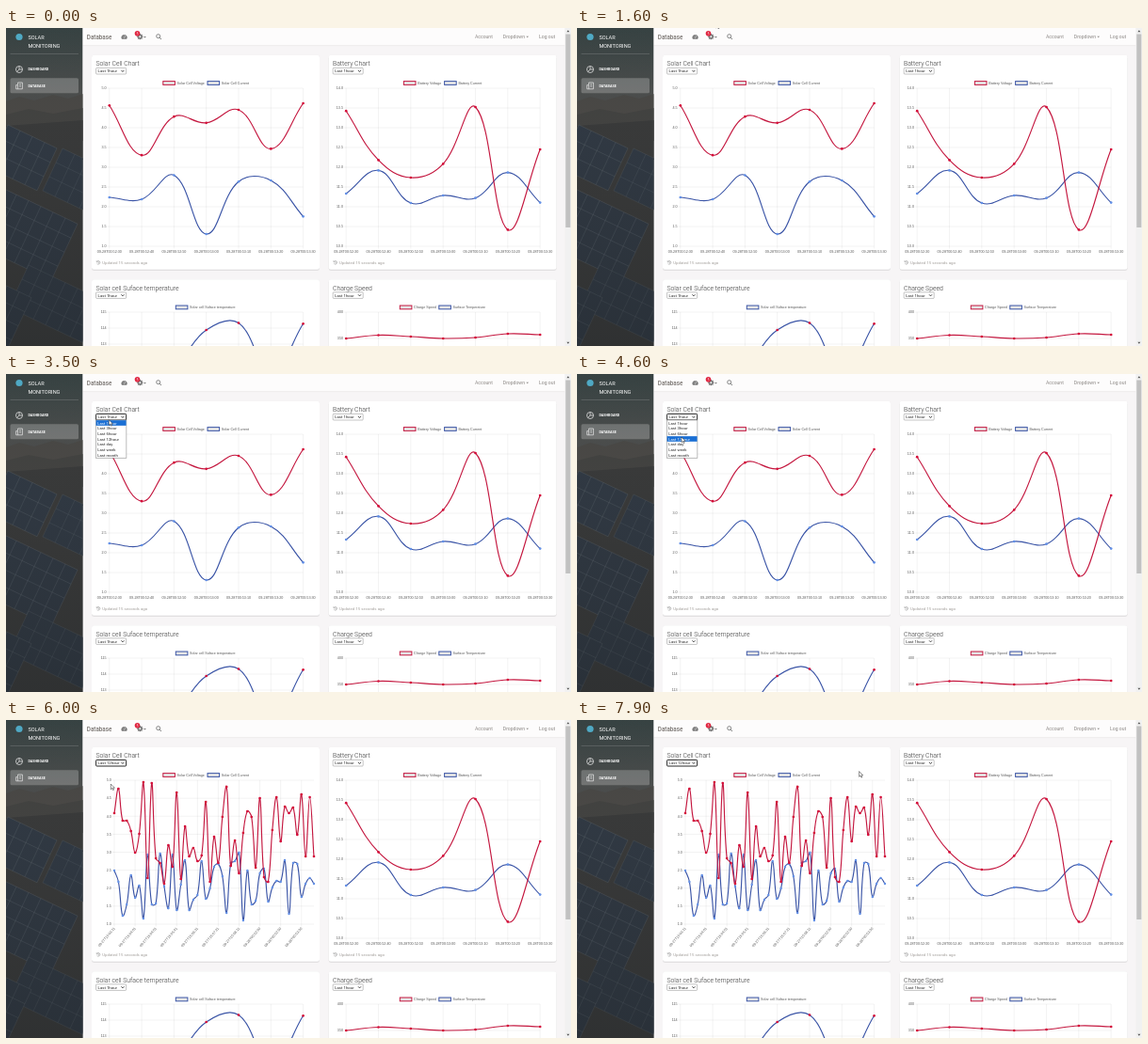
An HTML page for the animation above (8 s loop, 600 by 338 pixels).

```html
<!DOCTYPE html>
<html lang="en">
<head>
<meta charset="utf-8">
<title>Solar monitoring</title>
<style>
  html, body { margin: 0; width: 100%; height: 100%; overflow: hidden; background: #f7f5f6; }
  svg { display: block; width: 100vw; height: 100vh; }
  text { font-family: Roboto, sans-serif; white-space: pre; }
  .tick { font: 3.7px "Liberation Sans", Arial, sans-serif; fill: #555; }
  .grid { stroke: #000; stroke-opacity: .1; stroke-width: .5; fill: none; }
  .line { fill: none; stroke-width: 1.15; }
</style>
</head>
<body>
<svg id="stage" viewBox="0 0 600 338"></svg>
<script>
const LOOP = 8000, OPEN = 3000, PICK = 4950, UPDATE = 5085, EASE_MS = 1000;
const RED = { line: '#c4173f', dot: '#d50f3a' };
const BLUE = { line: '#3a54a6', dot: '#6390e6' };
const OPTIONS = ['1hour', '3hour', '6hour', '12hour', 'day', 'week', 'month'];
const ROW = 5.65, MENU_TOP = 49.2;

const text = (x, y, size, fill, str, extra = '') =>
  `<text x="${x}" y="${y}" font-size="${size}" fill="${fill}" ${extra}>${str}</text>`;
const tick = (x, y, str, anchor = 'start', extra = '') =>
  `<text class="tick" x="${x}" y="${y}" text-anchor="${anchor}" ${extra}>${str}</text>`;
const rect = (x, y, w, h, fill, extra = '') =>
  `<rect x="${x}" y="${y}" width="${w}" height="${h}" fill="${fill}" ${extra}/>`;
const path = (d, extra) => `<path d="${d}" ${extra}/>`;
const circle = (x, y, r, extra) => `<circle cx="${x}" cy="${y}" r="${r}" ${extra}/>`;
const range = (n, f) => Array.from({ length: n }, (_, i) => f(i));
const mix = (a, b, k) => a + (b - a) * k;

// Spline knots as [x, y, inX, inY, outX, outY], handles kept inside the plot
function knots(pts, box, tension = .4) {
  const cx = v => Math.min(box.r, Math.max(box.l, v));
  const cy = v => Math.min(box.b, Math.max(box.t, v));
  return pts.map(([x, y], i) => {
    const a = pts[i - 1] || [x, y], c = pts[i + 1] || [x, y];
    const d0 = Math.hypot(x - a[0], y - a[1]), d1 = Math.hypot(c[0] - x, c[1] - y);
    const ka = tension * d0 / (d0 + d1), kb = tension * d1 / (d0 + d1);
    const dx = c[0] - a[0], dy = c[1] - a[1];
    return [x, y, cx(x - ka * dx), cy(y - ka * dy), cx(x + kb * dx), cy(y + kb * dy)];
  });
}
function curve(ks) {
  return ks.map((k, i) => {
    const p = ks[i - 1];
    return i ? `C${p[4]} ${p[5]} ${k[2]} ${k[3]} ${k[0]} ${k[1]}` : `M${k[0]} ${k[1]}`;
  }).join('');
}
const series = (ks, color, dot = color.dot, r = 1.35) =>
  path(curve(ks), `class="line" stroke="${color.line}"`) +
  ks.map(k => circle(k[0], k[1], r, `fill="${dot}"`)).join('');
const spread = (ys, box) =>
  knots(ys.map((y, i) => [mix(box.l, box.r, i / (ys.length - 1)), y]), box);

function axes(box, top, step, count, rowH, cols, colW, digits) {
  let d = '', out = '';
  for (let i = 0; i < count; i++) {
    const y = box.t + i * rowH;
    d += `M${box.l - 2.5} ${y}H${box.r}`;
    out += tick(box.l - 3.2, y + 1.3, (top - i * step).toFixed(digits), 'end');
  }
  for (let i = 0; i < cols; i++) d += `M${box.l + i * colW} ${box.t}V${box.b + 2.5}`;
  return path(d, 'class="grid"') + out;
}
const TIMES = ['52:30', '52:40', '52:50', '53:00', '53:10', '53:20', '53:30'];
const hourLabels = box => TIMES.map((s, i) =>
  tick(mix(box.l, box.r, i / 6), 238.6, '09-28T00:' + s, 'middle')).join('');

const legend = (x, y, color, label) =>
  rect(x, y, 12.6, 3.8, 'rgba(0,0,0,.1)', `stroke="${color.line}" stroke-width="1"`) +
  tick(x + 14.8, y + 3.2, label);

function select(x, y, label, id = '') {
  return rect(x, y, 32, 6.6, '#fff', `rx=".8" stroke="#888" stroke-width=".5" ${id && `id="${id}"`}`) +
    text(x + 2, y + 4.9, 4.3, '#222', label, id && `id="${id}Text"`) +
    path(`M${x + 26.8} ${y + 2.5}l1.5 1.6 1.5 -1.6`, 'fill="none" stroke="#222" stroke-width=".8"');
}
function card(x, y, title, id) {
  return rect(x, y, 242, 228, '#fff', 'rx="2.4" filter="url(#shadow)"') +
    text(x + 4.4, y + 11.3, 6.85, '#333', title, 'font-weight="300"') +
    select(x + 4.6, y + 13.6, 'Last 1hour', id);
}
const updated = x =>
  path(`M${x} 248.2a1.8 1.8 0 1 1 -.1 2M${x - .4} 247.2v1.5h1.5M${x + 1.7} 248.3v1.3l.9 .5`,
    'fill="none" stroke="#999" stroke-width=".6"') +
  text(x + 5.6, 251.2, 4.35, '#a09c98', 'Updated 15 seconds ago');

function panelField(ox, oy, cols, rows, opacity) {
  const u = [13, 6.2], v = [-7, 15];
  const at = (i, j) => `${ox + i * u[0] + j * v[0]} ${oy + i * u[1] + j * v[1]}`;
  let d = '';
  for (let i = 0; i <= cols; i++) d += `M${at(i, 0)}L${at(i, rows)}`;
  for (let j = 0; j <= rows; j++) d += `M${at(0, j)}L${at(cols, j)}`;
  return path(`M${at(0, 0)}L${at(cols, 0)}L${at(cols, rows)}L${at(0, rows)}Z`, 'fill="#333d49"') +
    path(d, `stroke="#8c969e" stroke-opacity="${opacity}" stroke-width=".7" fill="none"`);
}
function sidebar() {
  return `<g clip-path="url(#side)">` + rect(0, 0, 81.5, 338, 'url(#sky)') +
    path('M0 78L14 73 30 77 50 71 66 75 82 70V120H0Z', 'fill="#514f4c"') +
    path('M0 92L24 86 50 91 82 85V140H0Z', 'fill="#484846"') +
    path('M0 104L82 98V338H0Z', 'fill="#3d3e3e"') +
    panelField(2, 103, 4, 3, .28) + panelField(60, 128, 4, 3, .22) +
    panelField(-2, 171, 6, 4, .3) + panelField(24, 252, 6, 3, .24) + panelField(-12, 268, 3, 5, .28) +
    rect(0, 0, 81.5, 338, 'url(#shade)') + '</g>' +
    circle(14, 9.5, 3.6, 'fill="#4fa9c4"') +
    text(23.4, 11.6, 5.6, '#fff', 'SOLAR') + text(23.4, 20.8, 5.6, '#fff', 'MONITORING') +
    rect(4.5, 27.3, 72.5, .4, '#fff', 'opacity=".35"') +
    rect(4.5, 53.3, 72.5, 16, '#fff', 'rx="1.6" opacity=".22"') +
    text(23.4, 45.4, 3.7, '#fff', 'DASHBOARD', 'font-weight="700"') +
    text(23.4, 62.7, 3.7, '#fff', 'DATABASE', 'font-weight="700"') +
    circle(14, 44, 3.5, 'fill="none" stroke="#ddd" stroke-width=".8"') +
    path('M14 40.5V44H17.5M14 44l-2.3 2.5M12.6 58h4.8v6.8h-6.7v-4.2h1.9zM12.6 60.6v4.2M14 60h2M14 62h2',
      'fill="none" stroke="#ddd" stroke-width=".8"');
}
function header() {
  const teeth = range(8, i => `M142.3 9.2l${3.1 * Math.cos(i * Math.PI / 4)} ${3.1 * Math.sin(i * Math.PI / 4)}`).join('');
  return rect(81.5, 0, 512, 18.8, '#fdfcfc') + rect(81.5, 18.6, 512, .5, '#dedcdc') +
    text(85.8, 11.8, 6.3, '#77726e', 'Database', 'font-weight="500"') +
    path('M123 11.8a3.1 3.1 0 1 1 5.2 0z', 'fill="#777"') +
    path('M125.6 10.8l1.1 -2.6M123.9 9.4h.6M125.6 7.2v.5', 'stroke="#fff" stroke-width=".6"') +
    path(teeth, 'stroke="#777" stroke-width="1.4"') +
    circle(142.3, 9.2, 1.6, 'fill="#fdfcfc" stroke="#777" stroke-width="1.3"') +
    path('M146.2 8.9h2.6l-1.3 1.5z', 'fill="#777"') +
    circle(139.5, 5.8, 2.8, 'fill="#e0243f"') + text(139.5, 7.1, 3.6, '#fff', '5', 'text-anchor="middle"') +
    circle(161.7, 8.7, 2, 'fill="none" stroke="#777" stroke-width=".9"') +
    path('M163.2 10.3l1.8 1.8', 'stroke="#777" stroke-width="1"') +
    text(498, 11, 5.1, '#8a8683', 'Account') + text(527.8, 11, 5.1, '#8a8683', 'Dropdown') +
    path('M552.4 8.7h2.6l-1.3 1.5z', 'fill="#8a8683"') + text(566, 11, 5.1, '#8a8683', 'Log out');
}
const scrollbar = () =>
  rect(593.6, 0, 6.4, 338, '#f1f1f1') + rect(594.3, 6.5, 5, 205.5, '#c1c1c1') +
  path('M595.4 4.2l1.5 -1.9 1.5 1.9zM595.4 333.8l1.5 1.9 1.5 -1.9z', 'fill="#555"');

const solar = { l: 109.8, r: 315.6, t: 64, b: 232 };
const dense = { l: 115, r: 327, t: 64, b: 217 };
const battery = { l: 361.2, r: 567.2, t: 64, b: 232 };
const heat = { l: 109.8, r: 315.6, t: 302, b: 470 };
const speed = { l: 361.2, r: 567.2, t: 302, b: 470 };

const hourRed = spread([82.3, 135.2, 94.2, 100.8, 87, 128.4, 80], solar);
const hourBlue = spread([180, 182, 156.5, 219, 163.3, 162, 200.3], solar);
const dayRed = spread([99, 73, 107, 107, 118, 141, 121, 66, 168, 67, 147, 152, 174, 133, 156, 77, 169,
  113, 145, 136, 150, 144, 87, 172, 124, 152, 103, 71, 155, 128, 163, 120, 97, 103, 157, 83, 167, 172,
  117, 82, 129, 92, 99, 93, 122, 79, 145, 82, 145], dense);
const dayBlue = spread([160, 172, 208, 196, 165, 189, 176, 211, 143, 196, 195, 142, 177, 200, 143, 202,
  175, 149, 202, 191, 186, 150, 190, 179, 156, 153, 166, 205, 152, 150, 141, 213, 160, 196, 192, 163,
  158, 193, 178, 171, 172, 149, 206, 152, 153, 188, 174, 168, 174], dense);

const HALF_DAY = ['27T15:03:11', '27T15:04:01', '27T15:04:51', '27T15:05:41', '27T15:06:31',
  '27T15:07:21', '27T15:08:11', '28T00:52:00', '28T00:52:50', '28T00:53:30'];
const STEP = 212 / 48 * 5;
const denseLabels = HALF_DAY.map((s, i) => {
  const x = dense.l + i * STEP + 1;
  return tick(x, 221.6, '09-' + s, 'end', `transform="rotate(-50 ${x} 221.6)"`);
}).join('');

const menu = `<g id="menu">` + rect(95.3, MENU_TOP - .2, 32.6, 40.2, '#fff', 'stroke="#777" stroke-width=".5"') +
  rect(95.6, MENU_TOP, 32, ROW, '#1a6fd4', 'id="mark"') +
  OPTIONS.map((o, i) => text(97.2, MENU_TOP + 4.4 + i * ROW, 4.3, '#222', 'Last ' + o, 'class="option"')).join('') + '</g>';

const $ = id => document.getElementById(id);
$('stage').innerHTML = `<defs>
  <clipPath id="side"><rect width="81.5" height="338"/></clipPath>
  <linearGradient id="sky" x2="0" y2="1"><stop stop-color="#3c4848"/><stop offset=".2" stop-color="#545655"/><stop offset="1" stop-color="#3c3e40"/></linearGradient>
  <linearGradient id="shade" x2="0" y2="1"><stop stop-color="#2a3434" stop-opacity=".3"/><stop offset=".3" stop-color="#222" stop-opacity=".15"/><stop offset="1" stop-color="#1b1e20" stop-opacity=".4"/></linearGradient>
  <filter id="shadow" x="-5%" y="-5%" width="110%" height="110%"><feDropShadow dx="0" dy=".5" stdDeviation=".7" flood-color="#777" flood-opacity=".45"/></filter>
</defs>` + rect(0, 0, 600, 338, '#f7f5f6') + header() + sidebar() +
  card(91, 28.8, 'Solar Cell Chart', 'pick') + card(342.6, 28.8, 'Battery Chart') +
  card(91, 267.2, 'Solar cell Suface temperature') + card(342.6, 267.2, 'Charge Speed') +
  legend(166.8, 56.6, RED, 'Solar Cell Voltage') + legend(214, 56.6, BLUE, 'Solar Cell Current') +
  legend(422.4, 56.6, RED, 'Battery Voltage') + legend(465.6, 56.6, BLUE, 'Battery Current') +
  legend(180.3, 295, BLUE, 'Solar cell Suface temperature') +
  legend(418.3, 295, RED, 'Charge Speed') + legend(459.8, 295, BLUE, 'Surface Temperature') +
  `<g id="hourAxes">${axes(solar, 5, .5, 9, 21, 7, 34.3, 1)}${hourLabels(solar)}</g>` +
  `<g id="denseAxes">${axes(dense, 5, .5, 9, 153 / 8, 10, STEP, 1)}${denseLabels}</g>` +
  `<g id="plot"></g>` +
  axes(battery, 14, .5, 9, 21, 7, 206 / 6, 1) + hourLabels(battery) +
  series(spread([176, 151.4, 186, 178, 180.7, 153.6, 185.6], battery), BLUE) +
  series(spread([88.2, 140.4, 159, 144.4, 84, 214.4, 129], battery), RED) +
  updated(96.6) + updated(348.3) +
  axes(heat, 115, 1, 3, 17, 7, 34.3, 0) +
  series(spread([365, 372, 360, 321, 313.5, 368, 314.3], heat), BLUE, RED.dot) +
  axes(speed, 400, 50, 2, 28, 7, 206 / 6, 0) +
  series(spread([330, 326.5, 328, 330, 329, 325, 326], speed), RED) +
  scrollbar() + menu +
  `<g id="cursor">${path('M0 0V5.7L1.4 4.5 2.3 6.6 3.2 6.2 2.3 4.2H4.1Z', 'fill="#fff" stroke="#222" stroke-width=".5"')}</g>`;

const options = [...document.querySelectorAll('.option')];
const TRACK = [[1500, 150, -9], [2200, 109, 46], [3300, 109, 46], [4200, 111, 67], [4600, 111, 67],
  [4900, 111.3, 68], [7200, 111.3, 68], [7800, 299.6, 54.6], [8000, 299.6, 54.6]];

function cursorAt(t) {
  const i = TRACK.findIndex(k => k[0] > t);
  if (i < 1) return [150, -9];
  const [t0, x0, y0] = TRACK[i - 1], [t1, x1, y1] = TRACK[i];
  const u = (t - t0) / (t1 - t0), k = u * u * (3 - 2 * u);
  return [mix(x0, x1, k), mix(y0, y1, k)];
}
// Only the points that already existed travel; the rest appear in place
const blend = (from, to, k) =>
  to.map((p, i) => from[i] ? p.map((v, j) => mix(from[i][j], v, k)) : p);
const show = (id, on) => { $(id).style.display = on ? '' : 'none'; };

let drawn = null;
function plot(t) {
  const k = t < UPDATE ? -1 : 1 - (1 - Math.min(1, (t - UPDATE) / EASE_MS)) ** 4;
  if (k === drawn) return;
  drawn = k;
  show('hourAxes', k < 0);
  show('denseAxes', k >= 0);
  $('plot').innerHTML = k < 0
    ? series(hourBlue, BLUE) + series(hourRed, RED)
    : series(blend(hourBlue, dayBlue, k), BLUE, BLUE.dot, 1.2) + series(blend(hourRed, dayRed, k), RED);
}
function frame() {
  const t = performance.now() % LOOP;
  const [x, y] = cursorAt(t);
  $('cursor').setAttribute('transform', `translate(${x} ${y})`);
  show('menu', t >= OPEN && t < PICK);
  const row = Math.max(0, Math.min(6, Math.floor((y + 1 - MENU_TOP) / ROW)));
  $('mark').setAttribute('y', MENU_TOP + row * ROW);
  options.forEach((o, i) => o.setAttribute('fill', i === row ? '#fff' : '#222'));
  $('pick').setAttribute('stroke', t < OPEN ? '#888' : '#111');
  $('pick').setAttribute('stroke-width', t < OPEN ? .5 : .9);
  $('pickText').textContent = t < PICK ? 'Last 1hour' : 'Last 12hour';
  plot(t);
  requestAnimationFrame(frame);
}
frame();
</script>
</body>
</html>
```
